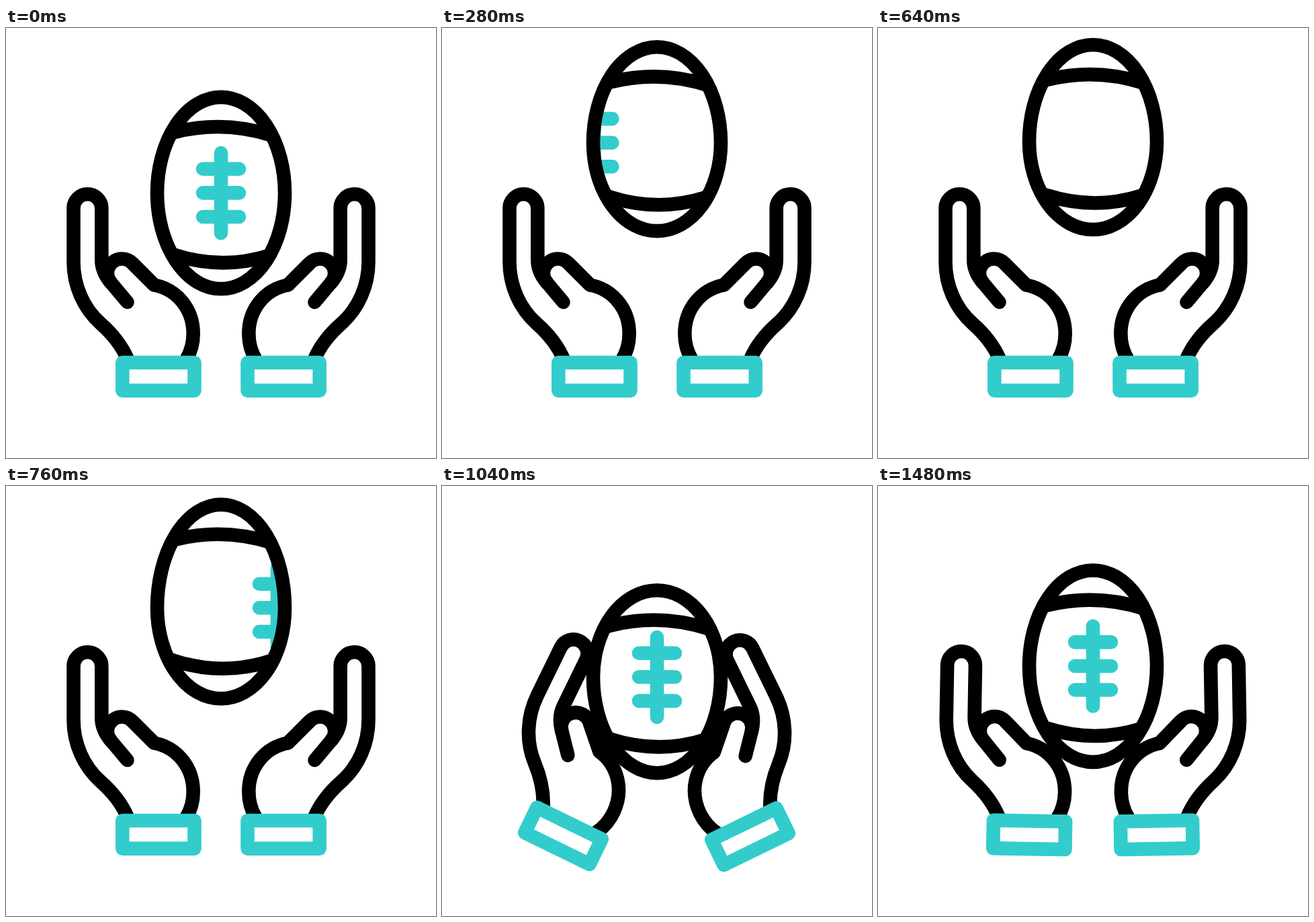
An HTML page that plays this animation: 640 px wide and 640 px high, repeating every 1.52 s.

```html
<!DOCTYPE html>
<html lang="en">
<head>
<meta charset="utf-8">
<title>Ball catch</title>
<style>
  html, body { margin: 0; width: 100%; height: 100%; overflow: hidden; background: #fff; }
  svg { display: block; width: 100%; height: 100%; }
  .ink, .teal { fill: none; stroke-width: 20.6; stroke-linecap: round; stroke-linejoin: round; }
  .ink { stroke: #000; }
  .teal { stroke: #3cc; }
  .butt { stroke-linecap: butt; }
</style>
</head>
<body>
<svg viewBox="0 0 640 640">
  <defs>
    <clipPath id="ballClip"><path id="clipShape"/></clipPath>
    <g id="hand">
      <path class="ink butt" d="M181 493 C172 472 158 455 141 440 C115 417 100.5 383 100.5 348
        V268.2 A20.9 20.9 0 0 1 142.3 268.2 V345 C142.3 358 148 370 157 380"/>
      <path class="ink" d="M180.5 408 L157 380 A21.5 21.5 0 0 1 188 350 L220.5 382.5"/>
      <path class="ink butt" d="M188 350 L220.5 382.5 C255 389 278.7 419 278.7 455 C278.7 469 275 482 268.5 493"/>
      <rect class="teal" x="173.3" y="498" width="107.2" height="41.6"/>
    </g>
  </defs>
  <g id="left"><use href="#hand"/></g>
  <g transform="matrix(-1 0 0 1 640 0)"><g id="right"><use href="#hand"/></g></g>
  <g clip-path="url(#ballClip)">
    <path id="lace" class="teal" d="M320 185.5 V304.5 M293 209.2 H347 M293 244.8 H347 M293 280.4 H347"/>
    <path id="topBand" class="ink" d="M245.5 156 Q320 135.5 395 159"/>
    <path id="lowBand" class="ink" d="M247 336 Q320 360.6 392 338"/>
  </g>
  <path id="outline" class="ink"/>
</svg>
<script>
const LOOP = 1520, STEP = 40;
// The throw begins before the loop point; one step is skipped there.
const CYCLE = LOOP + STEP;

// Eased progress from 0 at time a to 1 at time b.
function ease(t, a, b) {
  const s = Math.min(1, Math.max(0, (t - a) / (b - a)));
  return s * s * (3 - 2 * s);
}

const el = id => document.getElementById(id);
const move = (id, x, y) => el(id).setAttribute("transform", `translate(${x} ${y})`);
const turn = (id, angle, x, y) => el(id).setAttribute("transform", `rotate(${angle} ${x} ${y})`);

// Two half ellipses that meet on the line y = side.
function ballPath(top, side, bottom) {
  return `M225 ${side} A95 ${side - top} 0 0 1 415 ${side} A95 ${bottom - side} 0 0 1 225 ${side} Z`;
}

function draw(t) {
  const throwTime = t >= 1340 ? t - CYCLE : t;
  const lift = ease(throwTime, -204, 320) - ease(throwTime, 688, 1040);
  const y = 39.5 - 115.5 * lift;

  const lag = ease(t, 0, 320) - ease(t, 600, 1000);
  const stretch = ease(t, 600, 800) - ease(t, 800, 1040);
  const squash = ease(t, 800, 1040) - ease(t, 1040, 1160);
  const topShift = 13.5 * squash - 12.5 * stretch;
  const lowShift = -12 * lag;

  const shape = ballPath(102.3 + y + topShift, 245 + y, 387.7 + y + lowShift);
  el("outline").setAttribute("d", shape);
  el("clipShape").setAttribute("d", shape);
  move("topBand", 0, y + topShift);
  move("lowBand", 0, y + lowShift - 6.5 * stretch);

  // The lace leaves on the left and comes back from the right.
  const spin = t < 520 ? -ease(t, 0, 520) : 1 - ease(t, 520, 1000);
  move("lace", 168 * spin, y);

  const grip = 26 * (ease(t, 800, 1040) - ease(t, 1314, 1502));
  turn("left", grip, 199.4, 419.3);
  turn("right", grip, 197.7, 422);
}

const start = performance.now();
function tick() {
  const t = (performance.now() - start) % LOOP;
  draw(Math.floor((t + 1) / STEP) * STEP % LOOP);
  requestAnimationFrame(tick);
}
draw(0);
requestAnimationFrame(tick);
</script>
</body>
</html>
```
